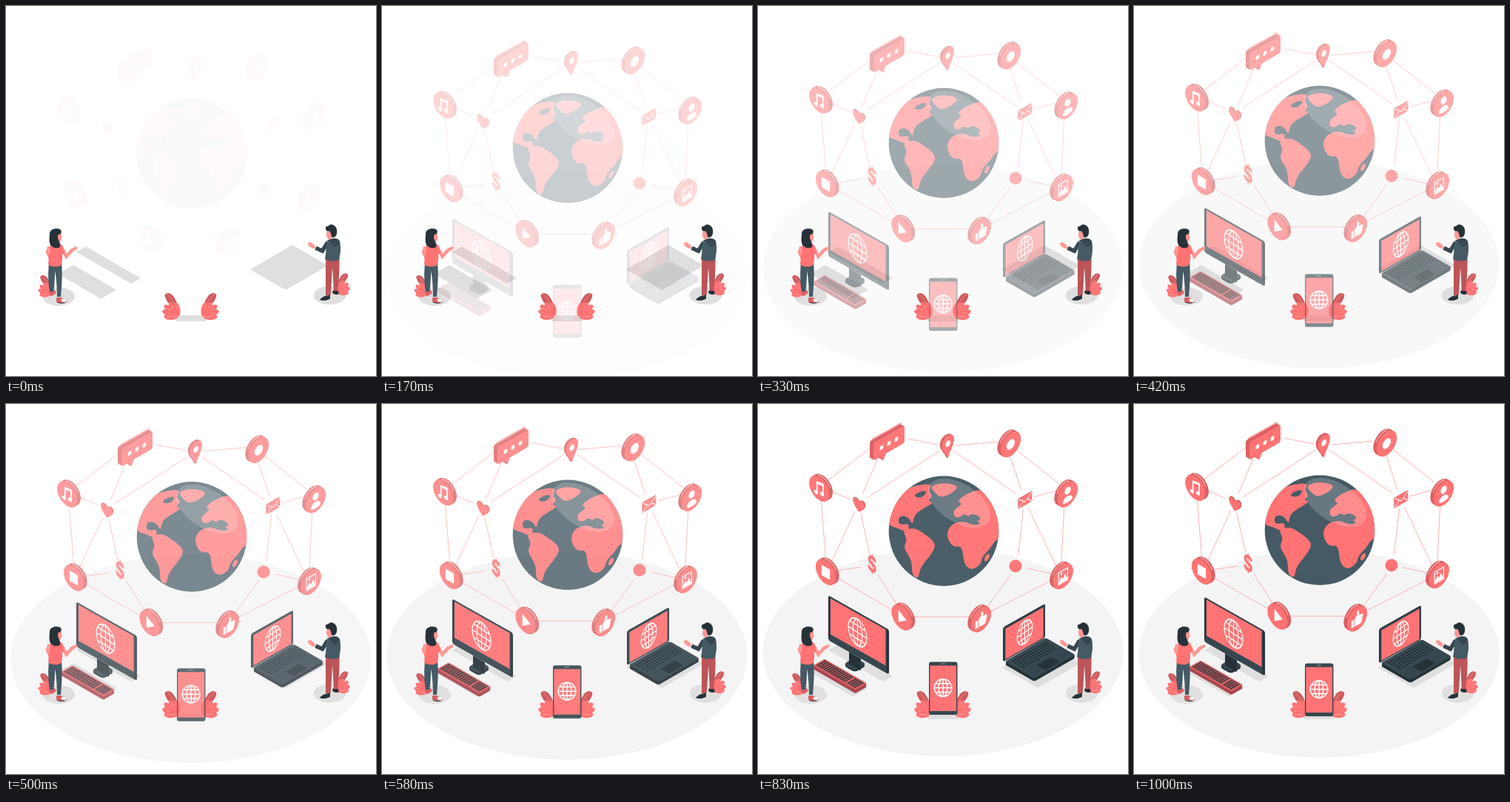
Recreate the animation shown at these times as an HTML page with a canvas. Size 500x500 px, loop 1.04 s.

```html
<!DOCTYPE html>
<html lang="en">
<head>
<meta charset="utf-8">
<title>Connected world</title>
<style>
html, body { margin: 0; width: 100%; height: 100%; overflow: hidden; background: #fff; }
canvas { display: block; width: 500px; height: 500px; }
</style>
</head>
<body>
<canvas id="stage"></canvas>
<script>
const SIZE = 500, LOOP = 1040, FPS = 24, RISE = 30;
const CORAL = '#ff7374', DEEP = '#d96163', LIGHT = '#ff9b9b', SKIN = '#ff9793';
const SLATE = '#455a64', STEEL = '#37474f', NIGHT = '#263238', SHADE = '#dfdfdf', WHITE = '#fff';
const COS = Math.cos(Math.PI / 6), SIN = 0.5;

const stage = document.getElementById('stage');
const dpr = window.devicePixelRatio || 1;
const buffer = document.createElement('canvas');
for (const c of [stage, buffer]) c.width = c.height = SIZE * dpr;
const main = stage.getContext('2d');
const side = buffer.getContext('2d');
let g = main;

// ---- drawing helpers ----
function fill(d, color) {
  g.fillStyle = color;
  g.fill(new Path2D(d));
}
function stroke(d, color, width) {
  g.strokeStyle = color;
  g.lineWidth = width;
  g.stroke(new Path2D(d));
}
function oval(x, y, rx, ry, color, turn = 0) {
  g.beginPath();
  g.ellipse(x, y, rx, ry, turn, 0, 7);
  g.fillStyle = color;
  g.fill();
}
function box(x, y, w, h, color, r = 0) {
  g.beginPath();
  g.roundRect(x, y, w, h, r);
  g.fillStyle = color;
  g.fill();
}
// closed curve through the midpoints of a rough outline
function blob(color, ...p) {
  const mid = (a, b) => [(a[0] + b[0]) / 2, (a[1] + b[1]) / 2];
  g.beginPath();
  g.moveTo(...mid(p[p.length - 1], p[0]));
  p.forEach((a, i) => g.quadraticCurveTo(...a, ...mid(a, p[(i + 1) % p.length])));
  g.fillStyle = color;
  g.fill();
}
function warp(matrix, draw) {
  g.save();
  g.transform(...matrix);
  draw();
  g.restore();
}
// isometric planes: upright (rising to the right when dir is 1) and lying on the floor
const wall = (x, y, dir, draw, tilt = SIN) => warp([COS, -tilt * dir, 0, 1, x, y], draw);
const floor = (x, y, draw) => warp([COS, SIN, -COS, SIN, x, y], draw);

// a wall shape with thickness: copies stepping back, then the face
function solid(x, y, dir, depth, draw) {
  for (let k = depth; k > 0; k -= 0.4)
    wall(x - dir * k, y - k * 0.56, dir, () => draw(DEEP));
  wall(x, y, dir, () => draw(CORAL));
}
// a floor slab: copies stepping up, then the top
function slab(x, y, w, d, depth, r, edge, top) {
  for (let k = depth; k >= 0; k -= 0.5)
    floor(x, y + k, () => box(0, 0, w, d, k ? edge : top, r));
}

// ---- ground ----
function shadows() {
  floor(108, 325, () => box(0, 0, 85.5, 15, SHADE));
  floor(91, 350, () => box(0, 0, 67, 24, SHADE));
  floor(387, 323, () => box(0, 0, 55.5, 66, SHADE));
  box(229, 418, 42, 8, SHADE, 2);
  oval(71, 392.5, 22, 12.5, SHADE);
  oval(437.5, 391, 22, 12.5, SHADE);
}

function plant(x, y, s, flip = 1) {
  warp([s * flip, 0, 0, s, x, y], () => {
    fill('M-1 -10C-6 -12 -17 -20 -18 -30C-15 -35 -8 -32 -5 -26C-1 -20 0 -15 -1 -10Z', '#cf5b5e');
    stroke('M-15 -31C-9 -26 -4 -19 -1 -10', LIGHT, 0.8);
    for (let i = 0; i < 5; i++) {
      const turn = -1.75 - 0.35 * i, len = 9.5 + 2.5 * Math.sin(Math.PI * i / 4);
      const c = Math.cos(turn), q = Math.sin(turn);
      oval(c * len, q * len - 1, len, 4.6, CORAL, turn);
      stroke(`M0 -1L${c * len * 1.6} ${q * len * 1.6 - 1}`, '#ffb9b9', 0.5);
    }
  });
}

function plants() {
  plant(232.5, 420.5, 1);
  plant(266.5, 420.5, 1, -1);
  plant(61, 390.5, 0.82);
  plant(447.5, 388, 0.82, -1);
}

// ---- devices ----
function webSign(x, y, r, a, b, width) {
  warp([a, b, 0, 1, x, y], () => {
    g.strokeStyle = WHITE;
    g.lineWidth = width;
    for (const rx of [r, r / 2]) {
      g.beginPath();
      g.ellipse(0, 0, rx, r, 0, 0, 7);
      g.stroke();
    }
    const h = r / 2, w = r * COS;
    stroke(`M0 ${-r}V${r}M${-r} 0H${r}M${-w} ${-h}H${w}M${-w} ${h}H${w}`, WHITE, width);
  });
}
function keys(x, y, w, h, cols, rows, color) {
  const cw = w / cols, ch = h / rows;
  for (let i = 0; i < cols; i++)
    for (let j = 0; j < rows; j++)
      box(x + i * cw, y + j * ch, cw - 0.8, ch - 0.8, color);
}

function monitor() {
  slab(131, 344.5, 18, 18, 2, 5, NIGHT, STEEL);
  wall(123, 337, -1, () => box(0, 0, 18.5, 16, NIGHT));
  wall(95, 260.5, -1, () => {
    box(0, 0, 94.7, 60.5, NIGHT, 3);
    box(2, 0.8, 89, 59.5, STEEL, 2);
    box(3.5, 2.4, 86, 48.6, CORAL);
  }, 0.49);
  webSign(134.5, 310.5, 17.8, 0.7, 0.46, 1.6);
}

function keyboard() {
  slab(90, 346.5, 66, 18, 4.5, 2, '#a84750', DEEP);
  floor(90, 346.5, () => {
    keys(2, 2, 46, 14, 13, 5, NIGHT);
    keys(50, 2, 14, 14, 4, 5, NIGHT);
  });
}

function laptop() {
  slab(389, 318, 46, 64, 4, 3, NIGHT, STEEL);
  floor(389, 318, () => {
    box(4, 4, 21, 56, SLATE);
    keys(4.5, 4.5, 20.5, 55.5, 5, 14, NIGHT);
    box(30, 22, 13, 22, NIGHT);
  });
  wall(331, 304, 1, () => {
    box(0, 0, 65.8, 46.5, NIGHT, 3);
    box(1.8, 1.5, 63, 44.5, STEEL, 2);
    box(4, 3.6, 59, 41.2, CORAL);
  }, 0.49);
  webSign(360.5, 310.5, 15.3, 0.68, -0.47, 1.5);
}

function phone() {
  box(231, 350.5, 38.5, 71.5, STEEL, 3);
  box(232.3, 355.5, 35.7, 61.5, CORAL);
  box(247, 352.5, 6, 0.9, '#90a4ae');
  webSign(250, 385.5, 11.8, 1, 0, 1.5);
}

function devices() {
  monitor();
  keyboard();
  laptop();
  phone();
}

// ---- globe ----
function globe() {
  g.save();
  g.beginPath();
  g.arc(251, 170.5, 74.3, 0, 7);
  g.fillStyle = SLATE;
  g.fill();
  g.clip();
  // the Americas and Greenland
  blob(CORAL, [170, 150], [195, 113], [236, 105], [230, 117], [236, 123], [230, 130], [238, 132], [222, 141],
    [211, 149], [209, 163], [203, 151], [190, 150], [190, 163], [204, 160], [203, 168], [208, 176], [190, 167], [176, 163]);
  blob(SLATE, [210, 123], [219, 117], [228, 116], [225, 123], [217, 126]);
  blob(CORAL, [195, 170], [211, 166], [223, 173], [241, 187], [236, 200], [219, 220], [217, 235], [208, 231], [208, 210], [196, 193], [202, 182]);
  blob(CORAL, [232, 110], [250, 105], [271, 109], [265, 118], [248, 126], [240, 120]);
  // Europe, Asia and Africa
  blob(CORAL, [265, 152], [264, 142], [277, 134], [269, 131], [280, 121], [305, 112], [335, 140], [330, 175], [316, 190],
    [303, 178], [300, 157], [286, 152], [279, 147], [273, 152]);
  blob(CORAL, [254, 176], [261, 161], [278, 157], [290, 163], [305, 160], [326, 170], [317, 191], [303, 205], [301, 216],
    [288, 224], [278, 215], [276, 190], [263, 193]);
  blob(SLATE, [283, 150], [291, 147], [301, 152], [299, 157], [289, 156]);
  oval(309.5, 206.5, 2.6, 5.6, CORAL, 0.5);
  oval(272, 133, 47, 26, 'rgba(255,255,255,.18)', 0.56);
  g.restore();
}

// ---- network: nodes are x, y and the clear space around them ----
const NODES = {
  chat: [175, 41, 28], pin: [255, 56, 11], dot: [334, 49, 10], person: [415, 113, 10],
  mail: [360, 128, 13], ball: [350, 218, 14], picture: [409, 231, 10], thumb: [300, 286.7, 10],
  play: [198, 286.7, 10], dollar: [154, 217, 15], tile: [93, 226, 10], heart: [136, 133, 13], note: [84, 110, 10]
};
const LINKS = ('chat-pin pin-dot chat-note chat-heart pin-heart pin-mail dot-mail dot-person mail-person ' +
  'note-heart note-tile heart-tile heart-dollar dollar-tile dollar-play tile-play play-thumb thumb-ball ' +
  'thumb-picture ball-mail ball-picture mail-picture person-picture').split(' ');

function links() {
  for (const pair of LINKS) {
    const [[ax, ay, ar], [bx, by, br]] = pair.split('-').map(n => NODES[n]);
    const len = Math.hypot(bx - ax, by - ay), ux = (bx - ax) / len, uy = (by - ay) / len;
    stroke(`M${ax + ux * ar} ${ay + uy * ar}L${bx - ux * br} ${by - uy * br}`, '#ff9c9c', 0.8);
  }
}

function disc(x, y, dir, glyph) {
  solid(x, y, dir, 4.6, color => oval(0, 0, 15.6, 15.6, color));
  // light along the upper rim
  wall(x - dir * 2.3, y - 1.3, dir, () => {
    const mid = dir > 0 ? 4.3 : 5.1;
    g.beginPath();
    g.arc(0, 0, 15.7, mid - 0.7, mid + 0.7);
    g.strokeStyle = LIGHT;
    g.lineWidth = 2;
    g.stroke();
  });
  wall(x, y, dir, glyph);
}

function note() {
  stroke('M-3.5 7V-7L6 -8.5V5', WHITE, 2);
  stroke('M-3.5 -6.5L6 -8', WHITE, 3.4);
  oval(-5.3, 7.3, 3, 2.5, WHITE);
  oval(4.2, 5.3, 3, 2.5, WHITE);
}
function tile() { box(-6.5, -7, 13, 14, WHITE); }
function dot() { oval(0, 0, 6.5, 6.5, WHITE); }
function play() { fill('M-5 -8L8 0L-5 8.5Z', WHITE); }
function person() {
  oval(0, -5, 4.7, 4.9, WHITE);
  fill('M-7.5 9C-7.5 0 7.5 0 7.5 9C4 11.5 -4 11.5 -7.5 9Z', WHITE);
}
function picture() {
  stroke('M-7 -8H7V8H-7Z', WHITE, 1.4);
  fill('M-7 7L-3 -1L0 3L3 -2L7 7Z', WHITE);
  oval(-2.5, -4.5, 1.6, 1.6, WHITE);
}
function thumb() {
  box(-9, -1, 4, 10, WHITE);
  fill('M-4 -1L0 -5V-9Q1 -11 3 -9Q4 -6 3 -3H8Q10 -2 9 0L7 8Q6 9 4 9H-4Z', WHITE);
}

function chat() {
  solid(156, 52, 1, 5, color => {
    box(0, 0, 48.5, 23.5, color, 3);
    fill('M9 22L15.5 31L20 22Z', color);
  });
  stroke('M154 47L194 24.5', LIGHT, 1.8);
  for (let i = 0; i < 3; i++)
    wall(167 + 10 * i, 57.7 - 5.6 * i, 1, () => oval(0, 0, 2.9, 2.9, WHITE));
}

function pin() {
  solid(256.7, 55, 1, 2.6, color =>
    fill('M0 17.5C-2 10 -9.5 4 -9.5 -4C-9.5 -10 -5 -13 0 -13C5 -13 9.5 -10 9.5 -4C9.5 4 2 10 0 17.5Z', color));
  wall(256.7, 52.5, 1, () => oval(0, 0, 3.8, 4, WHITE));
}

function heart() {
  solid(136, 135.5, -1, 1.5, color =>
    fill('M0 9C-6 4 -9 1 -9 -3.5C-9 -8 -3 -8.5 0 -4C3 -8.5 9 -8 9 -3.5C9 1 6 4 0 9Z', color));
}

function dollar() {
  g.font = '800 30px Inter, Arial, sans-serif';
  g.textAlign = 'center';
  g.textBaseline = 'middle';
  g.fillStyle = CORAL;
  warp([0.64, 0.33, 0, 1, 154, 217], () => g.fillText('$', 0, 0));
}

function mail() {
  solid(361.3, 128.8, 1, 0.8, color => box(-10.4, -6.6, 20.8, 13.2, color));
  wall(361.3, 128.8, 1, () =>
    stroke('M-10 -6L0 2L10 -6M-10 6L-3 -0.5M10 6L3 -0.5', WHITE, 1));
}

function network() {
  globe();
  links();
  chat();
  pin();
  heart();
  dollar();
  mail();
  oval(348, 218, 8.5, 8.5, CORAL);
  disc(82.8, 113.3, -1, note);
  disc(91.5, 226.3, -1, tile);
  disc(194, 287.3, -1, play);
  disc(301.5, 290, 1, thumb);
  disc(412.3, 231.8, 1, picture);
  disc(418.5, 121, 1, person);
  disc(341.5, 53.5, 1, dot);
}

// ---- people ----
function woman() {
  fill('M59 384H66L68 388L62 392L58 390Z', DEEP);
  fill('M68 394H75L82 398C82 402.5 75 403 68 399.5Z', DEEP);
  stroke('M69 400C74 402.5 79 402 81.5 399', NIGHT, 1);
  oval(78, 398, 3.4, 2.2, WHITE, 0.3);
  fill('M58 347H75C76.5 360 75.5 378 74 393H69C69 378 67.5 366 66.5 358C65.5 368 66 378 64 386H59C56.5 372 57 360 58 347Z', SLATE);
  stroke('M58.5 325L56 333L61 342', SKIN, 4.6);
  stroke('M75 326L81.5 338.5L90 329', SKIN, 4.6);
  oval(92, 328.5, 5, 2.2, SKIN, -0.5);
  fill('M60 322C64 318.5 72 319 76 323L79 334L76 336C76.5 341 76 346 74.5 350C70 353.5 61 353 57 349C58 342 57 338 59 333Z', CORAL);
  oval(71.5, 312, 4, 7, SKIN);
  fill('M59 308C59 301 69 299 74 302.5C76 306 74 309 70.5 309C68 315 75 320 73 326C66 329 60 325 59 320C58 315 59 312 59 308Z', NIGHT);
}

function man() {
  oval(445.5, 387, 4.5, 2.8, NIGHT, 0.3);
  fill('M424 397C427 393 432 391 438 391V396C434 399 428 400 424 397Z', NIGHT);
  stroke('M424.5 398C429 399.5 434 398.5 438 396', WHITE, 1);
  fill('M432 340H450.5C451 356 450 372 448 385H443C442 372 442 362 441 354C440 368 440 380 438.5 391H432C432 374 432 358 432 340Z', '#bb5558');
  oval(413, 323.5, 6, 2.8, SKIN, 0.65);
  stroke('M434.5 319.5L427.5 331L418.5 327', STEEL, 5.4);
  fill('M434 317C440 313 448 313 451 318C453 326 452 335 450 343C444 345.5 436 345 431 342C433 333 432 325 434 317Z', SLATE);
  fill('M437 317C441 313 449 313 451 318C450 325 444 327 441 323Z', STEEL);
  oval(437, 309, 4, 6.5, SKIN);
  fill('M432 301C431 297 436 298 437 296C440 294 446 297 447 302C448 308 446 313 441 313C439 311 440 307 437 304C435 305 432 304 432 301Z', NIGHT);
}

// ---- motion ----
function bezier(x1, y1, x2, y2) {
  const at = (s, a, b) => 3 * (1 - s) * (1 - s) * s * a + 3 * (1 - s) * s * s * b + s * s * s;
  return x => {
    if (x >= 1) return 1;
    let lo = 0, hi = 1;
    for (let i = 0; i < 30; i++) {
      const mid = (lo + hi) / 2;
      if (at(mid, x1, x2) < x) lo = mid; else hi = mid;
    }
    return at(lo, y1, y2);
  };
}
const easeOut = bezier(0, 0, 0.58, 1);
const overshoot = bezier(0.36, -0.01, 0.5, 1.38);

// paints a group that rises into place while fading in
function rise(e, paint) {
  g = side;
  g.setTransform(1, 0, 0, 1, 0, 0);
  g.clearRect(0, 0, buffer.width, buffer.height);
  g.setTransform(dpr, 0, 0, dpr, 0, RISE * (1 - e) * dpr);
  paint();
  g = main;
  g.globalAlpha = Math.max(0, Math.min(1, e));
  g.drawImage(buffer, 0, 0, SIZE, SIZE);
  g.globalAlpha = 1;
}

function render(ms) {
  // 24 steps a second, each starting on a 10 ms tick
  const tick = Math.floor((ms % LOOP) / 10) * 10;
  const step = Math.ceil((tick + 5) * FPS / 1000) - 1;
  const x = Math.min(1, step / FPS + 0.018);
  const slide = easeOut(x), spring = overshoot(x);

  g = main;
  g.setTransform(dpr, 0, 0, dpr, 0, 0);
  box(0, 0, SIZE, SIZE, WHITE);
  rise(spring, () => oval(250, 337.5, 243.5, 140.5, '#f4f4f4'));
  shadows();
  plants();
  rise(spring, devices);
  rise(slide, network);
  woman();
  man();
}

const start = performance.now();
function loop() {
  render(performance.now() - start);
  requestAnimationFrame(loop);
}
loop();
</script>
</body>
</html>
```
